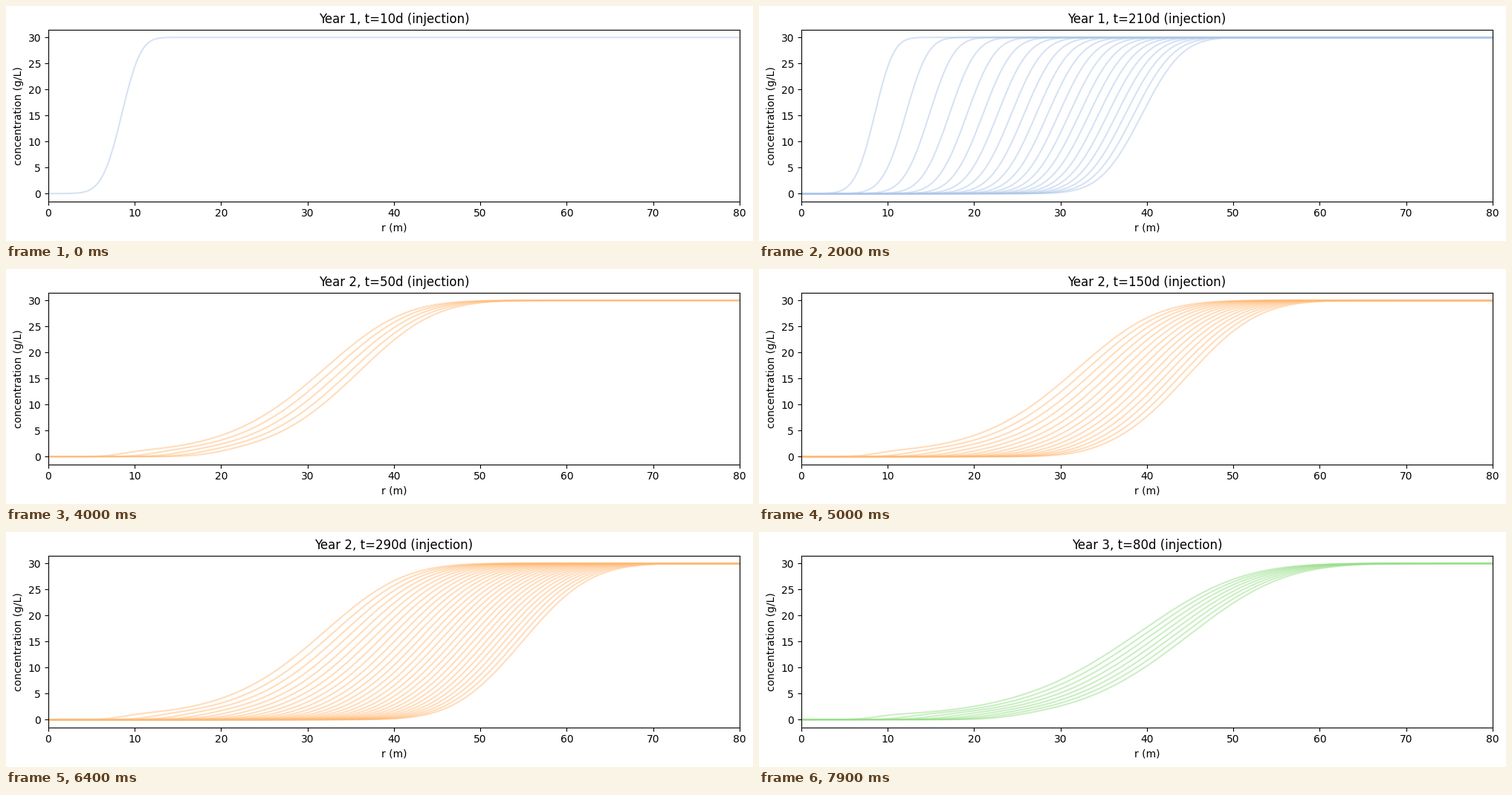
These frames come from a looping animation (1005x316 px, 8000 ms). A matplotlib script:

```python
import numpy as np
import matplotlib.pyplot as plt
from matplotlib.animation import FuncAnimation

plt.rcParams["font.family"] = "DejaVu Sans"

W, H, DPI = 1005, 316, 100
STEPS, INJECT_STEPS, FRAMES = 36, 30, 80   # ten-day steps per year
SALT = 30.0                                # g/L of native groundwater
ALPHA = 0.53                               # dispersivity, m
SWEPT_IN = 74.3                            # growth of r^2 per injection step
SWEPT_OUT = (1340 / 6, 1740 / 6)           # drop of r^2 per extraction step

LIGHT = ("#aec7e8", "#ffbb78", "#98df8a")
DARK = ("#1f77b4", "#ff7f0e", "#2ca02c")

N, DR = 380, 0.25
r = DR * (1 + np.arange(N))


def step_matrix(swept, sign, substeps=512):
    """Radial advection-dispersion of the fresh fraction over one step.

    The state carries a trailing 1 for the constant inflow term.
    """
    g = np.zeros((N + 1, N + 1))
    store = r * DR
    left, right = sign / 2 + ALPHA / DR, sign / 2 - ALPHA / DR
    i = np.arange(N - 1)
    g[i, i] -= left / store[:-1]
    g[i, i + 1] -= right / store[:-1]
    g[i + 1, i] += left / store[1:]
    g[i + 1, i + 1] += right / store[1:]
    if sign > 0:
        g[0, N] += 1 / store[0]
        g[N - 1, N - 1] -= 1 / store[-1]
    else:
        g[0, 0] -= 1 / store[0]
    dt = swept / 2 / substeps
    return np.linalg.matrix_power(np.linalg.inv(np.eye(N + 1) - dt * g), substeps)


def simulate():
    push = step_matrix(SWEPT_IN, 1)
    pull = [step_matrix(v, -1) for v in SWEPT_OUT]
    state = np.zeros(N + 1)
    state[N] = 1
    curves = []
    for k in range(FRAMES):
        year, step = divmod(k, STEPS)
        state = (push if step < INJECT_STEPS else pull[year]) @ state
        curves.append(SALT * (1 - state[:N]))
    return curves


fig = plt.figure(figsize=(W / DPI, H / DPI), dpi=DPI, facecolor="white")
ax = fig.add_axes([56.85 / W, 53.28 / H, 930 / W, 231 / H])
ax.set_xlim(0, 80)
ax.set_ylim(-1.5, 31.5)
ax.set_xticks(range(0, 81, 10))
ax.set_yticks(range(0, 31, 5))
ax.set_xlabel("r (m)")
ax.set_ylabel("concentration (g/L)")
title = ax.set_title("")

lines = []
for k, conc in enumerate(simulate()):
    year, step = divmod(k, STEPS)
    if step < INJECT_STEPS:
        style = dict(color=LIGHT[year], alpha=0.5)
    else:
        style = dict(color=DARK[year])
    lines += ax.plot(r, conc, lw=1.5, visible=False, **style)


def update(k):
    year, step = divmod(k, STEPS)
    phase = "injection" if step < INJECT_STEPS else "extraction"
    title.set_text(f"Year {year + 1}, t={10 * (step + 1)}d ({phase})")
    for j, line in enumerate(lines):
        line.set_visible(year * STEPS <= j <= k)
    return lines + [title]


anim = FuncAnimation(fig, update, frames=FRAMES, interval=100,
                     init_func=lambda: update(0), repeat=True, repeat_delay=0)
plt.show()
```
